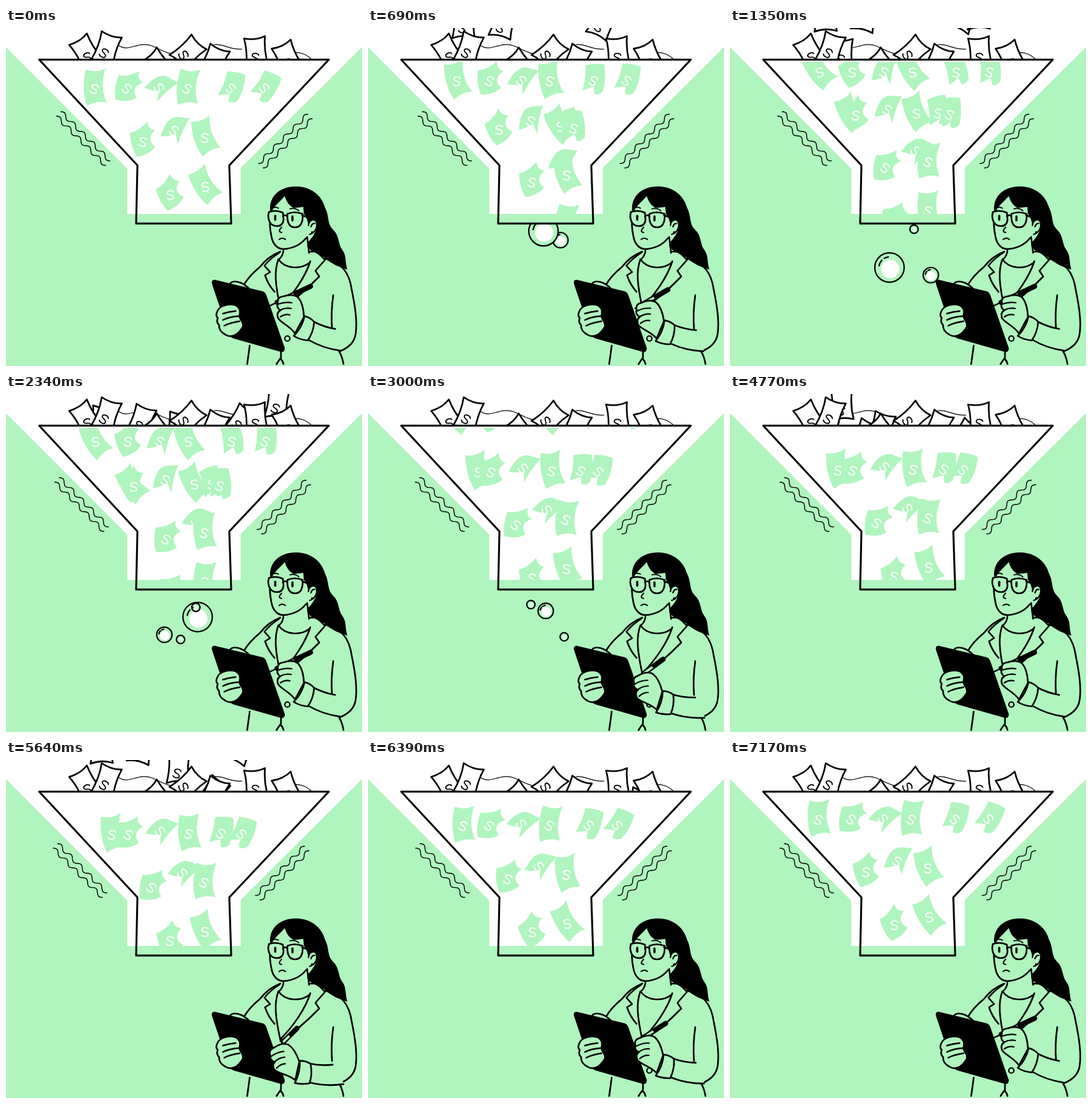
These frames come from a looping animation (558x529 px, 7200 ms). An HTML page with a canvas:

```html
<!DOCTYPE html>
<html>
<head>
<meta charset="utf-8">
<style>
html, body { margin: 0; width: 100%; height: 100%; overflow: hidden; background: #fff; }
canvas { display: block; }
</style>
</head>
<body>
<canvas id="stage" width="558" height="529"></canvas>
<script>
const LOOP = 7200, CYCLE = 900, TOSS = 3600, TAU = Math.PI * 2;
const GREEN = '#b0f5be', BLACK = '#000', WHITE = '#fff';
const ctx = document.getElementById('stage').getContext('2d');
ctx.lineCap = ctx.lineJoin = 'round';

const mix = (a, b, k) => a + (b - a) * k;
const clamp = k => Math.max(0, Math.min(1, k));
const easeIn = k => k * k;
const easeOut = k => 1 - Math.pow(1 - k, 1.5);

function shape(d, fill, line, width = 2.6) {
  const p = new Path2D(d);
  if (fill) { ctx.fillStyle = fill; ctx.fill(p); }
  if (line) { ctx.strokeStyle = line; ctx.lineWidth = width; ctx.stroke(p); }
}

function ink(d, width) { shape(d, null, BLACK, width); }

function disc(x, y, r, fill, line) {
  ctx.beginPath();
  ctx.arc(x, y, r, 0, TAU);
  if (fill) { ctx.fillStyle = fill; ctx.fill(); }
  if (line) { ctx.strokeStyle = BLACK; ctx.lineWidth = line; ctx.stroke(); }
}

function place(x, y, deg, draw) {
  ctx.save();
  ctx.translate(x, y);
  ctx.rotate(deg * Math.PI / 180);
  draw();
  ctx.restore();
}

function clipped(x, y, w, h, draw) {
  ctx.save();
  ctx.beginPath();
  ctx.rect(x, y, w, h);
  ctx.clip();
  draw();
  ctx.restore();
}

const DOLLAR = 'M6,-4 C4,-8 -4,-7 -4,-3 C-4,1 5,-1 5,4 C5,8 -3,8 -5,5';

// ---- notes falling inside the funnel
const FULL = 'M-15,-27 Q2,-21 16,-29 Q6,0 18,25 Q3,21 -13,30 Q-22,4 -15,-27 Z';
const NOTCH = 'M-20,-13 Q-4,-15 9,-28 Q9,-15 20,-13 Q2,0 17,13 Q7,24 -14,25 Q-22,8 -20,-13 Z';
const CURL = 'M-20,17 Q-18,-16 0,-19 L18,-21 Q10,0 9,23 L2,8 Q-8,14 -20,17 Z';
const HOOK = 'M-16,-20 Q2,-26 13,-24 Q19,0 15,18 Q8,26 2,23 L0,12 L-17,20 Q-13,0 -16,-20 Z';

// each lane drifts from one column to another, then merges with its neighbour
const LANES = [
  { form: FULL, from: 140, to: 258, ease: easeOut, span: 1500, life: 650, speed: 0.09, tilt: -18 },
  { form: NOTCH, from: 192, to: 258, ease: easeIn, span: 1500, life: 2600, speed: 0.092, tilt: -2 },
  { form: CURL, from: 243, to: 306, ease: easeIn, span: 1500, life: 1600, speed: 0.073, tilt: 18 },
  { form: FULL, from: 286, to: 312, ease: easeIn, span: 900, life: 2600, speed: 0.085, tilt: -12 },
  { form: HOOK, from: 355, to: 314, ease: easeOut, span: 850, life: 780, speed: 0.085, tilt: 2 },
  { form: HOOK, from: 408, to: 316, ease: easeOut, span: 850, life: 850, speed: 0.09, tilt: 14 }
];

function drop(lane, age) {
  const x = mix(lane.from, lane.to, lane.ease(clamp(age / lane.span)));
  const late = Math.min(0, age + 500) * 0.25;
  const y = 92 + age * (age < 0 ? 0.058 : lane.speed) + late;
  const tilt = lane.tilt + 19 * Math.cos((age - 50) / 1200 * TAU);
  place(x, y, tilt, () => {
    shape(lane.form, GREEN);
    place(-2, 3, 15, () => shape(DOLLAR, null, WHITE, 1.8));
  });
}

function innerNotes(t) {
  clipped(60, 53, 440, 238, () => {
    for (const lane of LANES) {
      for (let age = t % CYCLE - CYCLE; age < lane.life; age += CYCLE) drop(lane, age);
    }
  });
}

// ---- pile and tossed notes above the rim
function note(x, y, tilt) {
  place(x, y, tilt, () => {
    shape('M-16,-22 Q2,-17 17,-23 Q13,0 18,23 Q0,18 -17,25 Q-12,0 -16,-22 Z', WHITE, BLACK);
    place(-2, 9, 10, () => ink(DOLLAR, 1.8));
  });
}

function toss(x, age) {
  if (age < 0 || age > 700) return;
  const y = age < 200 ? mix(-46, 22, age / 200) : mix(22, 76, (age - 200) / 500);
  note(x, y, x * 7 % 60 - 30 + age / 60);
}

function tossedNotes(t) {
  const at = t % TOSS;
  for (let n = 0; n < 3; n++) {
    [150, 212, 368].forEach(x => toss(x, at - 580 - n * 690));
  }
  [237, 175, 390, 325, 270, 425].forEach((x, i) => toss(x, at - 690 - i * 295));
}

function pile(t) {
  clipped(0, 0, 558, 50, () => {
    ink('M176,27 C193,39 205,20 229,28 C243,34 251,40 266,42 M326,26 C342,24 347,34 370,33 M440,41 C458,34 472,42 479,49', 1.2);
    tossedNotes(t);
    note(124, 37, -31);
    note(158, 31, 19);
    note(238, 59, -40);
    note(326, 51, 24);
    note(286, 37, 46);
    note(440, 46, -24);
    note(391, 37, -5);
  });
}

// ---- shaking lines
function ripple(x, y, dir) {
  ctx.beginPath();
  for (let s = 0; s <= 110; s += 2) {
    const w = 3 * Math.sin(s / 22 * TAU);
    ctx.lineTo(x + dir * (s + w) * 0.7, y + (s - w) * 0.7);
  }
  ctx.strokeStyle = BLACK;
  ctx.lineWidth = 1.4;
  ctx.stroke();
}

function ripples(t) {
  const dx = -2.5 + 2.5 * Math.cos(t / 240 * TAU);
  for (const gap of [0, 7]) {
    ripple(79 + gap + dx, 138 - gap, 1);
    ripple(480 - gap + dx, 142 - gap, -1);
  }
}

// ---- bubbles leaving the spout; one sideways drift per bubble
const STREAMS = [
  { r: 12, first: 160, every: 1110, y: 288, speed: 0.083, drifts: [0.02, -0.04, -0.02] },
  { r: 23, first: 270, every: 1290, y: 282, speed: 0.086, drifts: [-0.038, 0.012] },
  { r: 6.5, first: 1180, every: 720, y: 303, speed: 0.07, drifts: [-0.015, 0.015, -0.094] }
];

function bubble(x, y, r) {
  const big = r > 8;
  disc(x, y, r, big && GREEN);
  disc(x + r * 0.05, y + r * 0.1, r * 0.62, big ? WHITE : '#d8fadf');
  disc(x, y, r, null, 2.2);
  if (!big) return;
  ctx.beginPath();
  ctx.arc(x, y, r * 0.72, 3.3, 3.9);
  ctx.moveTo(x - r * 0.35, y - r * 0.63);
  ctx.arc(x, y, r * 0.72, 4.2, 4.6);
  ctx.stroke();
}

function bubbles(t) {
  clipped(0, 306, 558, 223, () => {
    for (const { r, first, every, y, speed, drifts } of STREAMS) {
      drifts.forEach((drift, i) => {
        const age = t - first - i * every;
        if (age > 0 && age < 1240) bubble(291 + drift * age, y + speed * age, r);
      });
    }
  });
}

// ---- woman
function head() {
  shape('M414,286 C412,262 431,247 456,248 C480,249 495,263 500,281 C507,294 503,306 512,315 C523,325 520,337 527,347 C534,356 531,365 535,378 C524,375 509,369 499,359 C486,352 474,348 471,340 L466,280 Z', BLACK);
  shape('M437,263 C428,274 418,279 416,291 C412,305 414,317 416,326 C418,338 426,346 436,346 L430,363 Q450,385 475,368 L472,336 C482,328 490,312 487,303 C482,296 475,301 474,308 C471,291 463,285 455,284 C446,280 440,274 437,263 Z', GREEN);
  ink('M415,289 C412,305 414,317 416,326 C418,338 425,346 435,346 C450,345 462,339 470,329');
  ink('M474,309 C475,299 486,297 487,306 C488,314 483,321 476,323 M478,311 Q480,305 484,306', 2.2);
  ink('M472,327 L475,352 M435,346 Q435,356 428,362 M427,362 C438,378 463,378 476,367', 2.4);
  disc(480, 320, 2, BLACK);
  shape('M412,288 Q423,284 434,289 L435,300 Q434,310 425,310 Q412,310 411,294 Z', GREEN, BLACK);
  shape('M441,291 Q452,286 465,291 Q466,312 453,312 Q440,312 441,291 Z', GREEN, BLACK);
  ink('M434,295 Q438,291 441,295 M464,293 L477,298');
  ink('M422,294 v6 M449,295 v6', 3.4);
  ink('M432,312 Q425,319 432,320 M428,331 Q433,327 438,331', 2);
  ink('M417,282 Q422,279 427,282 M445,283 Q453,281 459,286', 1.8);
}

function jacket() {
  ink('M430,350 C417,355 407,362 398,374 C387,383 378,393 373,402');
  ink('M428,352 Q415,360 405,372 L414,382 L406,387 Q411,402 421,413 M427,362 C420,380 422,402 430,438');
  ink('M475,350 L486,350 Q494,356 500,363 L485,380 L491,389 Q460,421 430,440 M477,365 C469,390 450,417 430,437');
  ink('M500,361 C526,367 538,382 542,410 C547,435 551,459 548,479 C546,492 536,501 523,506 M513,418 Q509,445 511,471');
  ink('M382,497 Q380,512 378,526 M431,505 V516 Q427,521 424,526 M430,517 Q434,521 435,526 M522,506 Q527,514 529,526');
  disc(441, 486, 4, null, 2.2);
}

function clipboard() {
  shape('M350,402 C354,393 370,396 382,409 L360,412 Z', GREEN, BLACK);
  shape('M327,394 L402,412 Q406,413 408,418 L437,501 Q437,508 431,507 L357,486 Q351,484 349,478 L323,401 Q321,394 327,394 Z', BLACK);
  shape('M360,434 C350,431 334,434 331,444 Q328,450 332,454 Q329,460 334,465 Q333,474 344,480 C354,486 364,480 371,468 C374,460 365,456 366,450 Q369,438 360,434 Z', GREEN, BLACK);
  ink('M340,447 Q349,444 360,443 M340,457 Q350,452 364,451 M342,466 Q352,461 366,459', 2.4);
}

// writing strokes: start, end, depth
const STROKES = [[150, 1300, 0.35], [1400, 2300, 0.9], [2400, 3600, 0.7], [5270, 6000, 1], [6020, 7150, 0.7]];

function lowered(t) {
  const now = STROKES.find(([from, to]) => t > from && t < to);
  if (!now) return 0;
  const [from, to, depth] = now;
  return depth * Math.sin((t - from) / (to - from) * Math.PI) ** 2;
}

function pen(k) {
  const x = mix(413, 430, k), y = mix(435, 446, k);
  const dx = mix(67, 27, k), dy = mix(-32, -27, k);
  const part = (a, b, width, color) => {
    ctx.beginPath();
    ctx.moveTo(x + dx * a, y + dy * a);
    ctx.lineTo(x + dx * b, y + dy * b);
    ctx.lineWidth = width;
    ctx.strokeStyle = color;
    ctx.stroke();
  };
  part(0, 0.2, 2.4, BLACK);
  part(0.18, 0.65, 8, BLACK);
  part(0.2, 0.63, 3.5, GREEN);
  part(0.62, 0.96, 8, BLACK);
}

function forearm(k) {
  pen(k);
  ctx.save();
  ctx.translate(535, 488);
  ctx.rotate(-16 * k * Math.PI / 180);
  ctx.translate(-535, -488);
  shape('M470,453 L515,471 L525,505 L452,482 Z', GREEN);
  ink('M481,459 Q498,468 516,471 M474,488 Q496,501 524,505');
  shape('M426,430 Q425,421 435,420 Q450,415 458,422 Q466,431 467,452 L453,478 C444,465 429,461 426,453 Q424,445 430,442 Q423,437 426,430 Z', GREEN, BLACK);
  ink('M427,432 Q438,428 448,430 M429,442 Q438,437 447,439 M430,452 Q438,447 445,449', 2.2);
  shape('M468,451 Q477,453 483,460 Q482,476 473,489 Q461,488 451,482 Q464,469 468,451 Z', GREEN, BLACK);
  ctx.restore();
}

function frame(t) {
  ctx.fillStyle = WHITE;
  ctx.fillRect(0, 0, 558, 529);
  shape('M0,30 L190,220 V291 H368 V219 L558,30 V529 H0 Z', GREEN);
  innerNotes(t);
  pile(t);
  ripples(t);
  bubbles(t);
  ink('M52,49.5 H506 L350,215 L353,306 H204 L206,215 Z', 3);
  jacket();
  head();
  clipboard();
  forearm(lowered(t));
}

const begin = performance.now();
function tick() {
  const t = (performance.now() - begin) % LOOP;
  frame(Math.floor(t / 30) * 30);
  requestAnimationFrame(tick);
}
tick();
</script>
</body>
</html>
```
